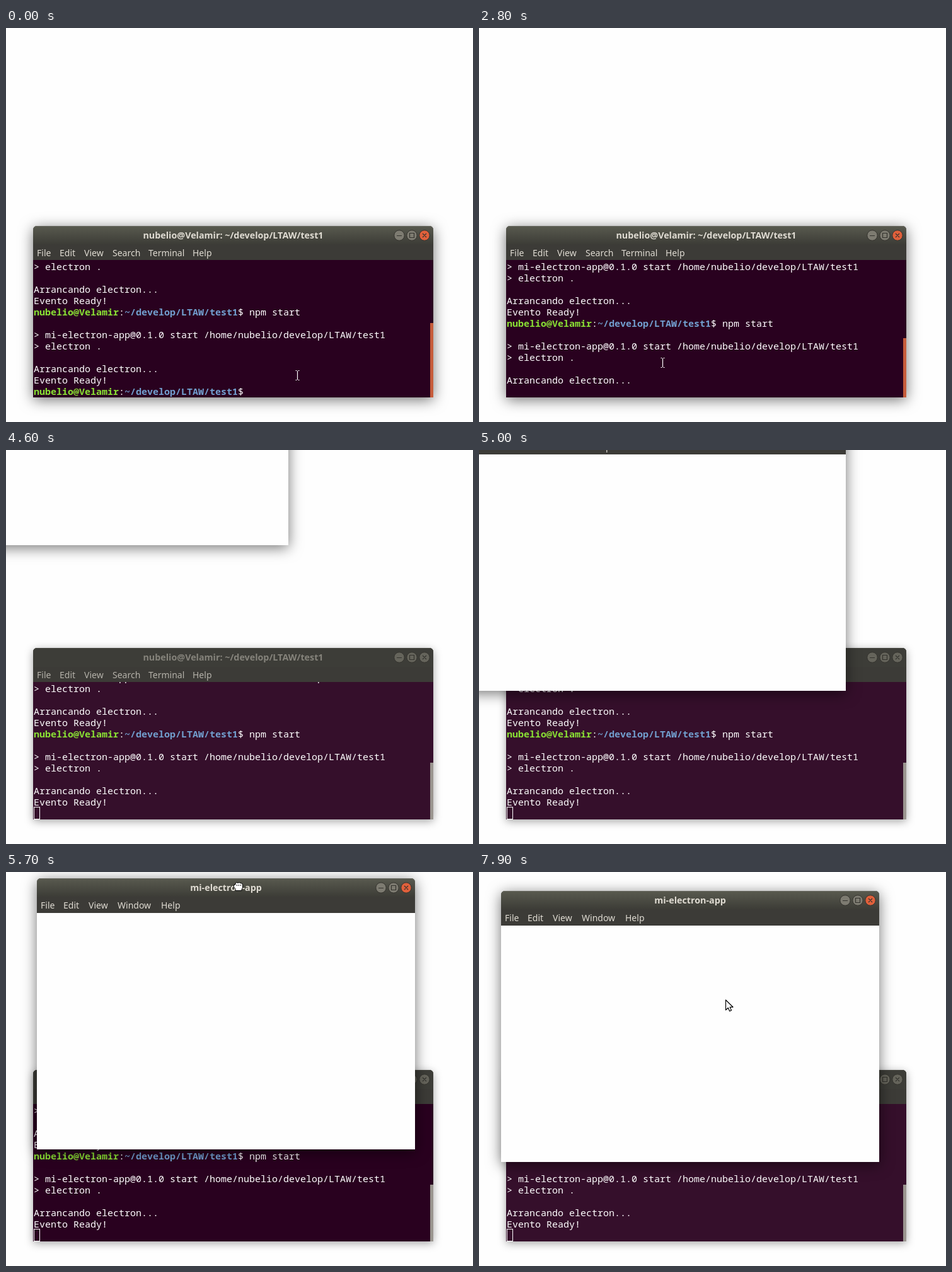
Animation, 741 px wide and 625 px high, one loop 8 s. Source, as an HTML page:

```html
<!DOCTYPE html>
<html lang="es">
<head>
<meta charset="utf-8">
<title>mi-electron-app</title>
<style>
html, body { margin: 0; width: 100%; height: 100%; overflow: hidden; background: #fefefe; }
#stage { position: relative; width: 741px; height: 625px; overflow: hidden; background: #fefefe; }
#stage div, #stage svg { position: absolute; }
.win {
  border-radius: 6px 6px 0 0; background: #3c3b37;
  box-shadow: 0 4px 22px rgba(0, 0, 0, .55);
  font: 14px "Noto Sans", "Open Sans", sans-serif; color: #dfdbd2;
}
.bar {
  left: 0; top: 0; width: 100%; height: 30px; border-radius: 6px 6px 0 0;
  background: linear-gradient(#595a4f, #3e3e38 92%, #3c3b37);
  box-shadow: inset 0 1px #686860;
  font-size: 14.3px; font-weight: 700; line-height: 29px; text-align: center; white-space: pre;
}
.menu span { position: absolute; top: 30px; line-height: 25px; }
.btns { top: 5px; right: 4px; width: 60px; height: 20px; }
.btns circle { fill: #7d7b71; stroke: #34332e; }
.btns .close { fill: #e0603b; }
.btns path { fill: none; stroke: #34332e; stroke-width: 1.2; }
.idle { box-shadow: 0 3px 14px rgba(0, 0, 0, .36); color: #b4b1a9; }
.idle .bar { background: #3d3d38; box-shadow: inset 0 1px #46463f; color: #85837b; }
.idle .btns circle, .idle .btns .close { fill: #65645b; }
#term { left: 43px; top: 314px; width: 635px; height: 272px; }
#screen {
  left: 0; top: 54px; width: 635px; height: 218px; overflow: hidden; background: #29011f;
  font: 15px/18px "Noto Sans Mono", "DejaVu Sans Mono", monospace; color: #fff; white-space: pre;
}
#log { left: 1px; top: 1px; }
#log p { margin: 0; height: 18px; }
#log b { color: #8ae234; }
#log b + b { color: #729fcf; }
#caret { top: 199px; width: 9px; height: 18px; background: #fff; box-sizing: border-box; }
#caret.hollow { top: 198px; width: 10px; height: 20px; background: none; border: 1px solid #fff; }
#thumb { right: 0; bottom: 0; width: 5px; background: #c65c3b; }
.idle #thumb { background: #9a958f; }
#app { width: 600px; height: 430px; }
#page { left: 0; top: 55px; width: 600px; height: 375px; background: #fefefe; }
.ptr { left: 0; top: 0; overflow: visible; }
</style>
</head>
<body>
<div id="stage">
  <div id="term" class="win">
    <div class="bar">nubelio@Velamir: ~/develop/LTAW/test1</div>
    <div id="screen">
      <div id="log"></div>
      <div id="caret"></div>
      <div id="thumb"></div>
    </div>
  </div>
  <div id="app" class="win">
    <div class="bar">mi-electron-app</div>
    <div id="page"></div>
  </div>
  <svg id="beam" class="ptr" width="8" height="16">
    <path d="M-3 -7.5H-1M1 -7.5H3M-3 7.5H-1M1 7.5H3M0 -7V7" stroke="#fff" stroke-width="1.2"/>
  </svg>
  <svg id="hand" class="ptr" width="16" height="14">
    <path d="M-5 6.5V3.5L-7.5 1V-2.5L-5 -3V-5L-3 -6.5L-1 -5.5L1 -6.5L3 -5.2L5 -5.2L6.5 -3V2L5 4.5V6.5Z"
      fill="#fff" stroke="#000" stroke-linejoin="round"/>
    <path d="M-2.5 -3V-1M.5 -3V-1M3.5 -3V-1" stroke="#000"/>
  </svg>
  <svg id="arrow" class="ptr" width="14" height="20">
    <path d="M.5 1V17L4.3 13.4L6.7 18.8L9.5 17.5L7.1 12.3H12Z"
      fill="#fff" stroke="#000" stroke-width="1.2" stroke-linejoin="round"/>
  </svg>
</div>
<script>
const $ = id => document.getElementById(id);
const LOOP = 8000, STEP = 100, ROW = 18, CELL = 9;
const UNFOCUS = 3100, DRAG = 4600;

const buttons = `<svg class="btns" viewBox="0 0 60 20">
  <circle cx="10" cy="10" r="8.2"/><circle cx="30" cy="10" r="8.2"/><circle class="close" cx="50" cy="10" r="8.2"/>
  <path d="M6 10.5H14M26.5 6.5H33.5V13.5H26.5ZM47 7L53 13M53 7L47 13"/></svg>`;

function dress(win, items) {
  const menu = items.map(([x, name]) => `<span style="left:${x}px">${name}</span>`).join("");
  win.insertAdjacentHTML("beforeend", `<div class="menu">${menu}</div>${buttons}`);
}
dress($("term"), [[6, "File"], [42, "Edit"], [81, "View"], [126, "Search"], [183, "Terminal"], [253, "Help"]]);
dress($("app"), [[6, "File"], [42, "Edit"], [82, "View"], [128, "Window"], [197, "Help"]]);

const prompt = "<b>nubelio@Velamir</b>:<b>~/develop/LTAW/test1</b>$ ";
const output = ["", "&gt; mi-electron-app@0.1.0 start /home/nubelio/develop/LTAW/test1",
  "&gt; electron .", "", "Arrancando electron...", "Evento Ready!"];
const lines = [...output.slice(2), prompt + "npm start", ...output,
  prompt + '<span id="cmd">npm start</span>', ...output, ""];
$("log").innerHTML = lines.map(s => `<p>${s}</p>`).join("");
const rows = [...$("log").children];

// time, index of the top line
const scroll = [[0, 0], [2400, 1], [2600, 5], [2800, 6], [3400, 7]];
// time, x, y
const drag = [[4600, -152, -279], [4700, -100, -200], [4800, -62, -135], [4900, -36, -85], [5000, -18, -48],
  [5200, 24, -14], [5400, 47, 5], [5700, 49, 10], [5900, 46, 18], [6000, 46, 18], [6300, 43, 24],
  [6500, 36, 29], [6600, 36, 29], [6700, 35, 29], [6800, 35, 30]];
const arrowPath = [[7200, 347, 40], [7400, 358, 92], [7600, 386, 184], [7700, 391, 203],
  [7800, 391, 203], [7900, 391, 202]];

const held = (track, t) => track.filter(k => k[0] <= t).pop()[1];

function along(track, t) {
  const i = track.findIndex(k => k[0] > t);
  if (i < 0) return track[track.length - 1].slice(1);
  const a = track[Math.max(i - 1, 0)], b = track[i];
  const f = Math.max(0, (t - a[0]) / (b[0] - a[0]));
  return [1, 2].map(n => Math.round(a[n] + (b[n] - a[n]) * f));
}

const within = (t, a, b) => t >= a && t < b;
const show = (el, on) => { el.style.visibility = on ? "visible" : "hidden"; };
const move = (el, x, y) => { el.style.transform = `translate(${x}px, ${y}px)`; };

function drawTerminal(t) {
  const first = held(scroll, t), idle = t >= UNFOCUS;
  $("term").classList.toggle("idle", idle);
  $("screen").style.background = idle && !within(t, 5500, 6500) ? "#350f2b" : "#29011f";
  move($("log"), 0, -first * ROW);
  rows.forEach((row, i) => show(row, !first || i < first + 11));
  $("cmd").style.display = t < 900 ? "none" : "";
  $("thumb").style.height = 118 - 4 * first + "px";

  const col = first ? 0 : t < 900 ? 38 : 47;
  const off = t < 600 || within(t, 2000, 2100) || within(t, 2600, 2900);
  $("caret").classList.toggle("hollow", idle);
  $("caret").style.left = 1 + col * CELL + "px";
  show($("caret"), !off);
}

function drawApp(t) {
  const [x, y] = along(drag, t);
  show($("app"), t >= DRAG);
  move($("app"), x, y);

  show($("hand"), within(t, DRAG, 7300));
  move($("hand"), t < 7000 ? x + 320 : 347, y + 13);
}

function drawPointer(t) {
  show($("beam"), t < 1000 || within(t, 2700, UNFOCUS));
  if (t < 1000) move($("beam"), 462.5, 551);
  else move($("beam"), 291.5, 531);

  const [x, y] = along(arrowPath, t);
  show($("arrow"), t >= 7300);
  move($("arrow"), x, y);
}

function tick() {
  const t = Math.floor(performance.now() % LOOP / STEP) * STEP;
  drawTerminal(t);
  drawApp(t);
  drawPointer(t);
  requestAnimationFrame(tick);
}
tick();
</script>
</body>
</html>
```
